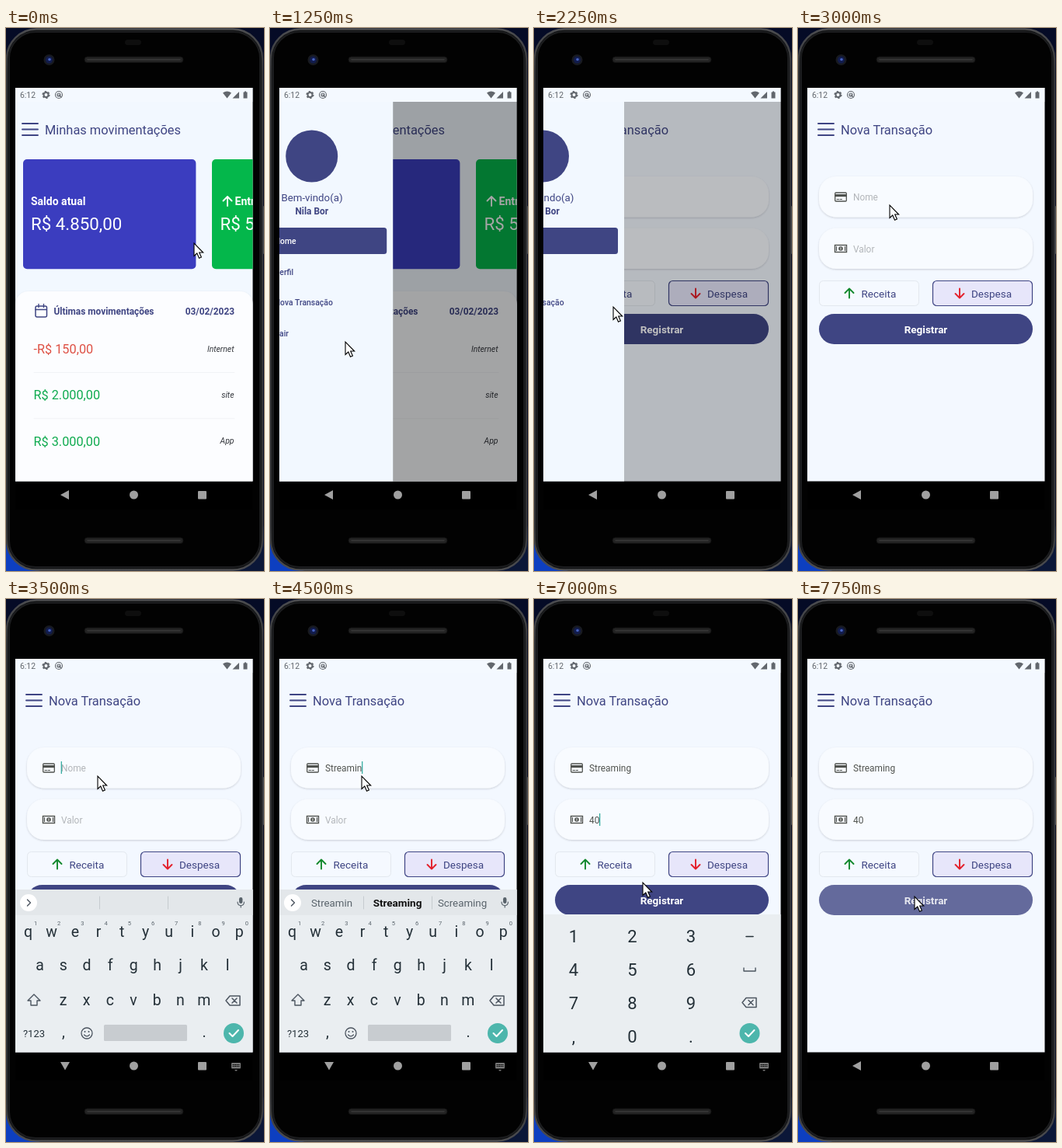
An HTML page that plays this animation: 332x699 px, repeating every 8 s.

```html
<!DOCTYPE html>
<html lang="pt-BR">
<head>
<meta charset="utf-8">
<title>Movimentações</title>
<style>
html, body { margin: 0; width: 100%; height: 100%; overflow: hidden; background: #050a1e; }
svg { display: block; width: 100%; height: 100%; }
text { font-family: Roboto, sans-serif; white-space: pre; }
</style>
</head>
<body>
<svg id="stage" viewBox="0 0 332 699"></svg>
<script>
const INK = '#3f4583';
const STEP = 250;
const LOOP = 8000;

const text = (x, y, s, size, fill = INK, extra = '') =>
  `<text x="${x}" y="${y}" font-size="${size}" fill="${fill}" ${extra}>${s}</text>`;
const rect = (x, y, w, h, fill, r = 0, extra = '') =>
  `<rect x="${x}" y="${y}" width="${w}" height="${h}" rx="${r}" fill="${fill}" ${extra}/>`;
const line = (d, color = INK, w = 1.5, extra = '') =>
  `<path d="${d}" fill="none" stroke="${color}" stroke-width="${w}" stroke-linecap="round" stroke-linejoin="round" ${extra}/>`;
const shape = (d, fill, extra = '') => `<path d="${d}" fill="${fill}" ${extra}/>`;
const circle = (x, y, r, fill, extra = '') => `<circle cx="${x}" cy="${y}" r="${r}" fill="${fill}" ${extra}/>`;
const group = (id, body, extra = '') => `<g id="${id}" ${extra}>${body}</g>`;
const MID = 'text-anchor="middle"';
const END = 'text-anchor="end"';
const BOLD = 'font-weight="700"';
const MEDIUM = 'font-weight="500"';

const menuIcon = x => line(`M${x} 123h20M${x} 130.5h20M${x} 138h20`, INK, 1.9);
const arrow = (x, y, dir, color) =>
  line(`M${x} ${y + 6 * dir}V${y - 6 * dir}M${x - 5.5} ${y - .5 * dir}L${x} ${y - 6 * dir}L${x + 5.5} ${y - .5 * dir}`, color, 1.9);
const backspace = (x, y) =>
  line(`M${x - 9} ${y}l5 -6h13v12h-13zM${x - 1} ${y - 3}l6 6m0 -6l-6 6`, '#4c5560', 1.5);
const doneKey = (x, y) => circle(x, y, 13, '#4db6ac') + line(`M${x - 5.5} ${y}l4 4l7.5 -8`, '#fff', 2);

function phone() {
  const speaker = y => rect(101, y, 127, 7.5, '#232323', 3.5, 'stroke="#111"') +
    line(`M105 ${y + 3.7}h119`, '#383838', 1.5);
  return rect(0, 0, 332, 699, '#050b26') +
    shape('M0 660V699H45Q12 692 0 660Z', '#0d3fc0') +
    shape('M250 699H332V640Q318 690 250 699Z', '#0b1738') +
    rect(329, 229, 3, 62, '#55585c', 1) + rect(0, 188, 2, 8, '#44474b') +
    rect(1, 1.5, 329, 696, '#101112', 38, 'stroke="url(#rim)" stroke-width="2.4"') +
    rect(4, 5, 323, 689, '#020202', 34, 'stroke="#1c1d1f" stroke-width="2"') +
    speaker(37) + speaker(656) +
    rect(153, 15, 21, 7, '#0e0e0e', 3.5) +
    circle(55.5, 41, 7, '#181a20') + circle(55.5, 41, 4.5, '#121c4c') + circle(56, 40.5, 1.8, '#4560bd');
}

function statusBar() {
  const c = '#62676d';
  return rect(12, 77, 305.5, 18, '#f4f9ff') + text(18, 90, '6:12', 10.4, c) +
    circle(51.5, 86, 3, 'none', `stroke="${c}" stroke-width="2"`) +
    circle(51.5, 86, 4.4, 'none', `stroke="${c}" stroke-width="1.4" stroke-dasharray="2.3 2.3"`) +
    circle(68, 86, 4.5, 'none', `stroke="${c}" stroke-width="1.1"`) +
    circle(68, 86, 2, 'none', `stroke="${c}" stroke-width="1.2"`) + line('M68 86l3 3', c, 1.1) +
    shape('M279 83.5Q284.500 79.500 290 83.500L284.500 90.500Z', c) +
    shape('M291.500 90.500H300V82Z', c) +
    shape('M305.500 82.500h1.500v-1h2v1h1.500v8h-5z', c);
}

function homePage() {
  const rows = [['-R$ 150,00', 'Internet', '#de5145'], ['R$ 2.000,00', 'site', '#10ab50'], ['R$ 3.000,00', 'App', '#10ab50']];
  return rect(12, 77, 306, 507, '#f2f8ff') + menuIcon(21) + text(50, 137, 'Minhas movimentações', 16.42) +
    rect(22, 169, 222.4, 141.2, '#3b3dbf', 5) + rect(265, 169, 222, 141.2, '#04b74b', 5) +
    text(32, 228, 'Saldo atual', 14, '#fff', BOLD) + text(32, 260, 'R$ 4.850,00', 22.3, '#fff') +
    arrow(285, 223, 1, '#fff') + text(294.5, 228, 'Entradas', 14, '#fff', BOLD) +
    text(275.5, 260, 'R$ 5.000,00', 22.3, '#fff') +
    rect(12, 339, 306, 270, '#fcfdff', 17, 'filter="url(#soft)"') +
    rect(38, 358, 14.500, 14, 'none', 2, `stroke="${INK}" stroke-width="1.5"`) +
    line('M38 362.500h14M42 355.500v4M48.500 355.500v4', INK, 1.4) +
    text(61.5, 368.6, 'Últimas movimentações', 11.87, INK, BOLD) + text(294, 368.6, '03/02/2023', 11.87, INK, BOLD + END) +
    rows.map(([value, label, color], i) => {
      const y = 419 + 59.3 * i;
      return text(35.5, y, value, 16.3, color) +
        text(293.5, y - 2.5, label, 10.4, '#33363c', END + ' font-style="italic"') +
        (i < 2 ? line(`M36 ${y + 24.5}H294`, '#f1f3f6', 1) : '');
    }).join('');
}

function formPage() {
  const field = y => rect(27, y, 275, 52.5, '#f8fbff', 22, 'filter="url(#soft)"');
  const ink = '#50534f';
  return rect(12, 77, 306, 507, '#f3f8ff') + menuIcon(26) + text(55, 137, 'Nova Transação', 16.42) +
    field(191) + field(257.5) +
    rect(47.7, 212, 14.6, 11, 'none', 1, `stroke="${ink}" stroke-width="1.3"`) +
    rect(47.5, 214, 15, 3.2, ink) + line('M50 220.500h2.500M54 220.500h2.500', ink, 1) +
    rect(47.5, 279.5, 15, 9, 'none', 0, `stroke="${ink}" stroke-width="1.4"`) +
    circle(55, 284, 2.8, ink) + line('M55 282.700v2.600', '#fff', .9) +
    line('M49.500 281.500v5M60.500 281.500v5', ink, 1.2) +
    text(71, 222, '', 11.87, ink, 'id="name"') + text(71, 288.5, '', 11.87, ink, 'id="amount"') +
    rect(70.5, 209, 1.2, 16, '#26a69a', 0, 'id="caret"') +
    rect(27.5, 325.5, 128, 32, '#f5f9ff', 5, 'stroke="#e3e8ee"') +
    rect(173.5, 325.5, 128, 32, '#e7e6fa', 5, `stroke="${INK}" stroke-width="1.2"`) +
    arrow(66, 341.5, 1, '#12892d') + text(81.5, 347, 'Receita', 13.5) +
    arrow(208, 341.5, -1, '#e3202b') + text(223, 347, 'Despesa', 13.5) +
    rect(27, 368, 275, 39, INK, 19.5, 'id="submit"') +
    text(164.5, 393, 'Registrar', 13.5, '#fff', MID + BOLD + ' id="submitLabel"');
}

function drawer() {
  const items = [['Home', '#fff'], ['Perfil', INK], ['Nova Transação', INK], ['Sair', INK]];
  return rect(12, 95, 208, 489, '#f2f8ff') +
    circle(115.5, 165, 33.5, INK) +
    text(115.8, 222.7, 'Bem-vindo(a)', 13.3, INK, MID) + text(115.5, 240, 'Nila Bor', 11.87, INK, MID + BOLD) +
    rect(19, 257, 193, 34, INK, 3.5) + rect(19, 336.5, 146, 34, '#abadb4', 4, 'id="ripple"') +
    items.map(([s, c], i) => text(67.5, 278 + 39.6 * i, s, 10.4, c, MEDIUM)).join('') +
    line('M28 272.500L35 266L42 272.500V281.500H28ZM32.500 281.500v-7h5v7', '#fff', 1.4) +
    circle(34.5, 309.5, 3.3, 'none', `stroke="${INK}" stroke-width="1.4"`) +
    line('M28 321v-1.500q0 -3.500 3.500 -3.500h6q3.500 0 3.500 3.500v1.500') +
    rect(26, 347, 17.5, 13, 'none', 2, `stroke="${INK}" stroke-width="1.4"`) + line('M26 351.500h17.500', INK, 1.4) +
    line('M32.500 386h-5v14h5M32 393h10M38 389l4 4l-4 4');
}

const key = (x, y, s, size = 19.5) => text(x, y, s, size, '#243038', MID);

function letterKeys() {
  const row = (letters, x, y) => [...letters].map((s, i) => key(x + 30.2 * i, y, s)).join('');
  const digits = [...'1234567890'].map((s, i) => text(38 + 30.2 * i, 420, s, 7.5, '#59636b', MID)).join('');
  return rect(12, 374, 306, 210, '#eaeef1') + rect(12, 374, 306, 33, '#e3e7ea') +
    circle(29, 391, 11, '#fff') + line('M27.500 387l4 4l-4 4', '#4c5560', 1.4) +
    text(79.5, 396, '', 13.3, '#59636b', MID + ' id="typed"') +
    text(164, 396, '', 13.5, '#111', MID + BOLD + ' id="guess"') +
    text(247.5, 396, '', 13.3, '#59636b', MID + ' id="other"') +
    line('M120.500 383v16M208.500 383v16', '#c6cbcf', 1) +
    rect(300, 384, 4.4, 8, '#59636b', 2.2) + line('M298 390q0 4.500 4.200 4.500t4.200 -4.500M302.200 394.500v2.500', '#59636b', 1.2) +
    digits + row('qwertyuiop', 28.5, 435) + row('asdfghjkl', 43.5, 478) + row('zxcvbnm', 73.5, 523) +
    line('M36 509l8 8h-4v6h-8v-6h-4z', '#4c5560', 1.4) + backspace(292, 517) +
    key(36, 563.5, '?123', 13) + key(74, 564, ',') + key(255, 564, '.') +
    circle(104, 559, 7, 'none', 'stroke="#4c5560" stroke-width="1.3"') +
    circle(101.5, 557, 1, '#4c5560') + circle(106.5, 557, 1, '#4c5560') + line('M100.500 561q3.500 3.500 7 0', '#4c5560', 1.2) +
    rect(126, 548, 107, 21, '#c8ccd0', 1.5) + doneKey(293, 559);
}

function numberKeys() {
  const rows = ['123', '456', '789', ',0.'];
  return rect(12, 406, 306, 178, '#eaeef1') +
    rows.map((r, j) => [...r].map((s, i) => key(51 + 75.5 * i, 442 + 43 * j, s, 22)).join('')).join('') +
    line('M273 434.500h9', '#243038', 1.6) + line('M270 475v4h15v-4', '#4c5560', 1.4) +
    backspace(277, 519.5) + doneKey(277.5, 559);
}

function navBar() {
  const c = '#a0a0a0';
  return rect(12, 583, 305, 37, '#000') + shape('M70 601L81 595V607Z', c, 'id="back"') +
    shape('M70 596H82L76 606.500Z', c, 'id="hide"') +
    circle(164.5, 601, 5.5, c) + rect(247, 596, 11, 10.5, c, 1) +
    group('kbIcon', rect(290, 597, 12, 7.5, '#777', 1) +
      line('M292 599.500h8M292 601.500h8', '#000', 1, 'stroke-dasharray="1 1.500"') + shape('M294 606h4l-2 2z', '#777'));
}

stage.innerHTML = `<defs>
  <clipPath id="screen"><rect x="12" y="77" width="305.5" height="506.5"/></clipPath>
  <linearGradient id="rim" x1="0" y1="0" x2="0" y2="1">
    <stop offset="0" stop-color="#4c4d50"/><stop offset=".08" stop-color="#333437"/>
    <stop offset=".92" stop-color="#333437"/><stop offset="1" stop-color="#4c4d50"/></linearGradient>
  <filter id="soft" x="-5%" y="-15%" width="110%" height="135%">
    <feDropShadow dx="0" dy="1" stdDeviation="1.3" flood-color="#334" flood-opacity=".22"/></filter></defs>` +
  phone() + navBar() +
  group('content', group('home', homePage()) + group('form', formPage()) +
    rect(12, 95, 306, 489, '#000', 0, 'id="shade"') + group('drawerPanel', drawer()) +
    group('letters', letterKeys()) + group('numbers', numberKeys()) + statusBar(), 'clip-path="url(#screen)"') +
  shape('M0 0V16.500L3.800 13L6.500 19.300L9.400 18L6.700 12H11.700Z', '#fff', 'id="pointer" stroke="#000" stroke-width="1.1"');

// Each entry changes the state from its step onwards.
const timeline = [
  { at: 0, x: 242, y: 277, page: 'home', open: 0, name: '', amount: '', caret: '', keys: '' },
  { at: 1, x: 150, y: 205 },
  { at: 2, x: 48, y: 140 },
  { at: 3, x: 32, y: 128 },
  { at: 4, x: 42, y: 190 },
  { at: 5, x: 97, y: 404, open: .703 },
  { at: 6, x: 99, y: 380, open: 1 },
  { at: 7, x: 102, y: 359 },
  { at: 8, ripple: true },
  { at: 9, ripple: false, page: 'form', open: .5 },
  { at: 10, x: 104, y: 335, open: 0 },
  { at: 11, x: 114, y: 246 },
  { at: 12, x: 118, y: 228 },
  { at: 13, caret: 'name' },
  { at: 14, keys: 'letters' },
  { at: 15, name: 'S' },
  { at: 16, name: 'Str' },
  { at: 17, name: 'Stream' },
  { at: 18, name: 'Streamin' },
  { at: 20, name: 'Streaming' },
  { at: 21, x: 112, y: 250 },
  { at: 22, x: 97, y: 285, caret: 'amount' },
  { at: 23, keys: 'numbers' },
  { at: 25, amount: '4' },
  { at: 26, amount: '40' },
  { at: 27, x: 108, y: 310, caret: '' },
  { at: 28, x: 140, y: 365, caret: 'amount' },
  { at: 29, x: 150, y: 383, caret: '' },
  { at: 30, keys: '' },
  { at: 31, pressed: true }
];

const el = id => document.getElementById(id);
const show = (id, on) => el(id).style.display = on ? '' : 'none';

function setField(id, value, hint) {
  el(id).textContent = value || hint;
  el(id).setAttribute('fill', value ? '#50534f' : '#b2b5b9');
}

function render(step) {
  const s = Object.assign({}, ...timeline.filter(entry => entry.at <= step));
  for (const id of ['home', 'form']) show(id, s.page === id);
  for (const id of ['letters', 'numbers']) show(id, s.keys === id);
  show('back', !s.keys);
  show('hide', s.keys);
  show('kbIcon', s.keys);
  show('ripple', s.ripple);
  show('drawerPanel', s.open);
  el('drawerPanel').setAttribute('transform', `translate(${-208 * (1 - s.open)} 0)`);
  el('shade').setAttribute('opacity', s.open * .5);
  setField('name', s.name, 'Nome');
  setField('amount', s.amount, 'Valor');
  show('caret', s.caret);
  if (s.caret) {
    el('caret').setAttribute('x', 70.7 + (s[s.caret] ? el(s.caret).getComputedTextLength() : 0));
    el('caret').setAttribute('y', s.caret === 'name' ? 209 : 276);
  }
  el('typed').textContent = s.name;
  el('guess').textContent = s.name.length > 3 ? 'Streaming' : s.name;
  el('other').textContent = s.name.length > 3 ? 'Screaming' : '';
  el('submit').setAttribute('fill', s.pressed ? '#646a9c' : INK);
  el('submitLabel').setAttribute('opacity', s.pressed ? .85 : 1);
  el('pointer').setAttribute('transform', `translate(${s.x} ${s.y})`);
}

let shown = -1;
const start = performance.now();
function tick() {
  const step = Math.floor((performance.now() - start) % LOOP / STEP);
  if (step !== shown) render(shown = step);
  requestAnimationFrame(tick);
}
tick();
</script>
</body>
</html>
```
